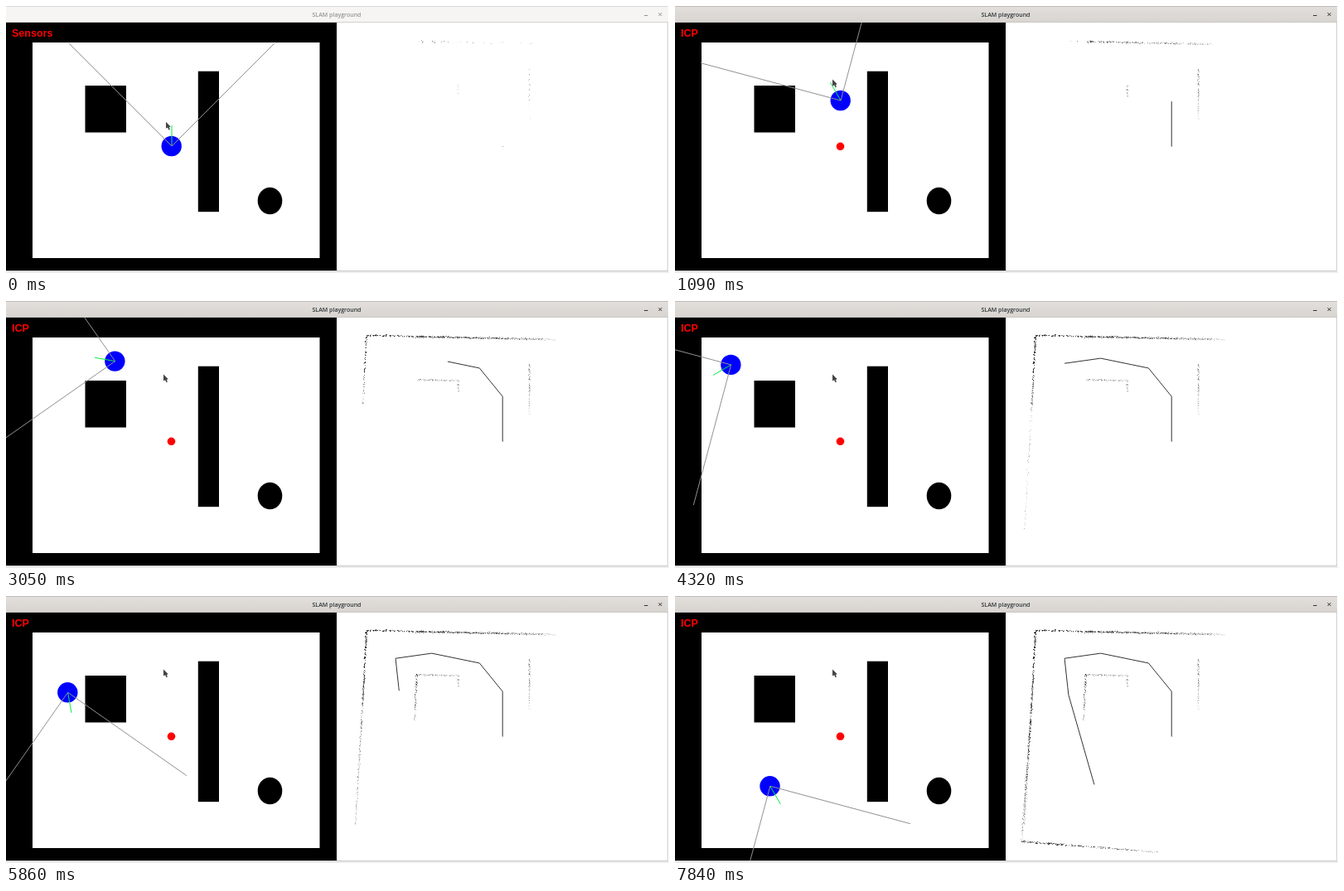
An HTML page with a canvas that plays this animation: 800 px wide and 322 px high, repeating every 8 s.

```html
<!DOCTYPE html>
<html lang="en">
<head>
<meta charset="utf-8">
<title>SLAM playground</title>
<style>
  html, body { margin: 0; width: 100%; height: 100%; overflow: hidden; background: #fff; }
  canvas { display: block; width: 800px; height: 322px; }
</style>
</head>
<body>
<canvas id="stage" width="800" height="322"></canvas>
<script>
const ctx = document.getElementById('stage').getContext('2d');
const LOOP = 8000, ICP_START = 1090, MAP_LEFT = 399;

// One key press drives 5 px or turns 10 degrees.
const DRIVE = { size: 5, ms: 70 }, TURN = { size: 10, ms: 75 };
// The estimate slightly underrates both distance and rotation.
const ODOMETRY = 0.98;

// Each move turns left, then drives: [start, degrees, distance]
const moves = [
  [20, 0, 55], [800, 40, 45], [2190, 40, 60], [3380, 20, 45], [4170, 20, 0],
  [4430, 70, 35], [5790, 0, 10], [6000, 10, 115], [7690, 10, 0],
];

// Scanned walls on the map: [x1, y1, x2, y2, from, to, darkness]
const walls = [
  [497, 42.5, 648, 45.5, -90, 900, 0.7],
  [631, 76, 631, 137, -200, 900, 0.5],
  [545.5, 95, 545, 110, -200, 900, 0.5],
  [433, 41, 662, 46, 1090, 1760, 1],
  [434.5, 40, 430, 126, 1500, 4320, 1.3],
  [496, 94.5, 546, 95.5, 2410, 3050, 0.6],
  [432, 95, 421, 276, 3630, 5860, 0.6],
  [495, 94, 492.5, 151, 4710, 5860, 0.8],
  [430, 130, 418, 296, 5860, 7250, 0.9],
  [418, 295.5, 582, 308.5, 6370, 7600, 1],
];

let seed = 7;
const random = () => (seed = seed * 16807 % 2147483647) / 2147483647;

const points = walls.flatMap(([x1, y1, x2, y2, from, to, darkness]) => {
  const length = Math.hypot(x2 - x1, y2 - y1);
  const steep = Math.abs(y2 - y1) > Math.abs(x2 - x1);
  return Array.from({ length: length * 2.2 }, () => {
    const u = random(), jitter = 1.4 * (random() + random() - 1);
    return {
      x: Math.round(x1 + (x2 - x1) * u + (steep ? jitter : 0)),
      y: Math.round(y1 + (y2 - y1) * u + (steep ? 0 : jitter)),
      born: from + (to - from) * random(),
      alpha: Math.min(0.8, darkness * random() * (0.85 - 0.65 * u)),
    };
  });
});

const stepped = (elapsed, { size, ms }, total) =>
  Math.min(total, size * Math.max(0, Math.floor(elapsed / ms)));

// Dead reckoning; `scale` below 1 yields the drifting estimate.
function trace(t, x, y, scale) {
  let heading = 0;
  const trail = [[x, y]];
  for (const [start, degrees, distance] of moves) {
    if (t < start) break;
    heading -= scale * stepped(t - start, TURN, degrees);
    const driveStart = start + degrees / TURN.size * TURN.ms;
    const d = scale * stepped(t - driveStart, DRIVE, distance);
    [x, y] = ahead(x, y, heading, d);
    trail.push([x, y]);
  }
  return { x, y, heading, trail };
}

function ahead(x, y, heading, distance) {
  const a = heading * Math.PI / 180;
  return [x + distance * Math.sin(a), y - distance * Math.cos(a)];
}

function rect(color, x, y, w, h) {
  ctx.fillStyle = color;
  ctx.fillRect(x, y, w, h);
}

function ellipse(color, x, y, rx, ry = rx) {
  ctx.fillStyle = color;
  ctx.beginPath();
  ctx.ellipse(x, y, rx, ry, 0, 0, 2 * Math.PI);
  ctx.fill();
}

function polyline(color, pts) {
  ctx.strokeStyle = color;
  ctx.beginPath();
  pts.forEach(([x, y]) => ctx.lineTo(x, y));
  ctx.stroke();
}

function label(text, font, color, x, y, align) {
  ctx.font = font;
  ctx.fillStyle = color;
  ctx.textAlign = align;
  ctx.fillText(text, x, y);
}

function drawWindow(focused) {
  rect('#fff', 0, 0, 800, 322);
  const ink = focused ? '#2e3436' : '#929595';
  const bar = ctx.createLinearGradient(0, 0, 0, 20);
  bar.addColorStop(0, focused ? '#e2dfdc' : '#f6f5f4');
  bar.addColorStop(1, focused ? '#d8d4d0' : '#f6f5f4');
  rect(bar, 0, 0, 799, 20);
  rect(focused ? '#aaa6a2' : '#c8c6c4', 0, 0, 799, 0.6);
  rect('#c6c2be', 0, 19.3, 799, 0.7);
  label('SLAM playground', '600 7px "Open Sans", sans-serif', ink, 399, 12.7, 'center');
  rect(ink, 770, 11, 4.5, 1);
  polyline(ink, [[787.5, 8.2], [791.3, 12]]);
  polyline(ink, [[791.3, 8.2], [787.5, 12]]);
  rect('#c9c9c9', 0, 319, 799, 1);
  rect('#ececec', 0, 320, 800, 2);
  rect('#d0d0d0', 798, 20, 1, 300);
}

function drawWorld(t) {
  const { x, y, heading } = trace(t, 200, 169, 1);
  ctx.save();
  ctx.beginPath();
  ctx.rect(0, 20, MAP_LEFT, 299);
  ctx.clip();
  rect('#000', 0, 20, MAP_LEFT, 299);
  rect('#fff', 32, 44, 346.5, 260);
  rect('#000', 95.5, 96, 49.5, 56.5);
  rect('#000', 231.8, 78.7, 25.2, 169.5);
  ellipse('#000', 318.5, 235, 14.8, 16.2);
  label(t < ICP_START ? 'Sensors' : 'ICP', 'bold 12.5px "Liberation Sans", Arial, sans-serif',
    '#f00', 7, 37, 'left');

  ellipse('#f00', 199.5, 169.3, 4.8);
  ellipse('#00f', x - 0.3, y, 12.2);
  const ray = (color, offset, length) =>
    polyline(color, [[x, y], ahead(x, y, heading + offset, length)]);
  ray('#00f040', 0, 25);
  ray('#919191', -45, 175);
  ray('#919191', 45, 175);
  ctx.restore();
}

function drawMap(t) {
  rect('#fff', MAP_LEFT, 20, 399, 299);
  for (const p of points) {
    if (t >= p.born) rect(`rgba(0,0,0,${p.alpha})`, p.x, p.y, 1, 1);
  }
  rect('#999', 599, 169, 1, 1);
  polyline('#333', trace(t, 599.2, 169, ODOMETRY).trail);
}

function drawCursor(t) {
  const u = Math.min(1, t / 314);
  ctx.save();
  ctx.translate(193 - 3 * u, 140 - 51.5 * u);
  ctx.fillStyle = '#444';
  ctx.fill(new Path2D('M0 0V8L2 6.7 3.6 9.8 4.8 9.2 4 6.2 5.8 5.8Z'));
  ctx.restore();
}

const start = performance.now();
function tick() {
  const t = (performance.now() - start) % LOOP;
  drawWindow(t >= 20);
  drawWorld(t);
  drawMap(t);
  drawCursor(t);
  requestAnimationFrame(tick);
}
tick();
</script>
</body>
</html>
```
